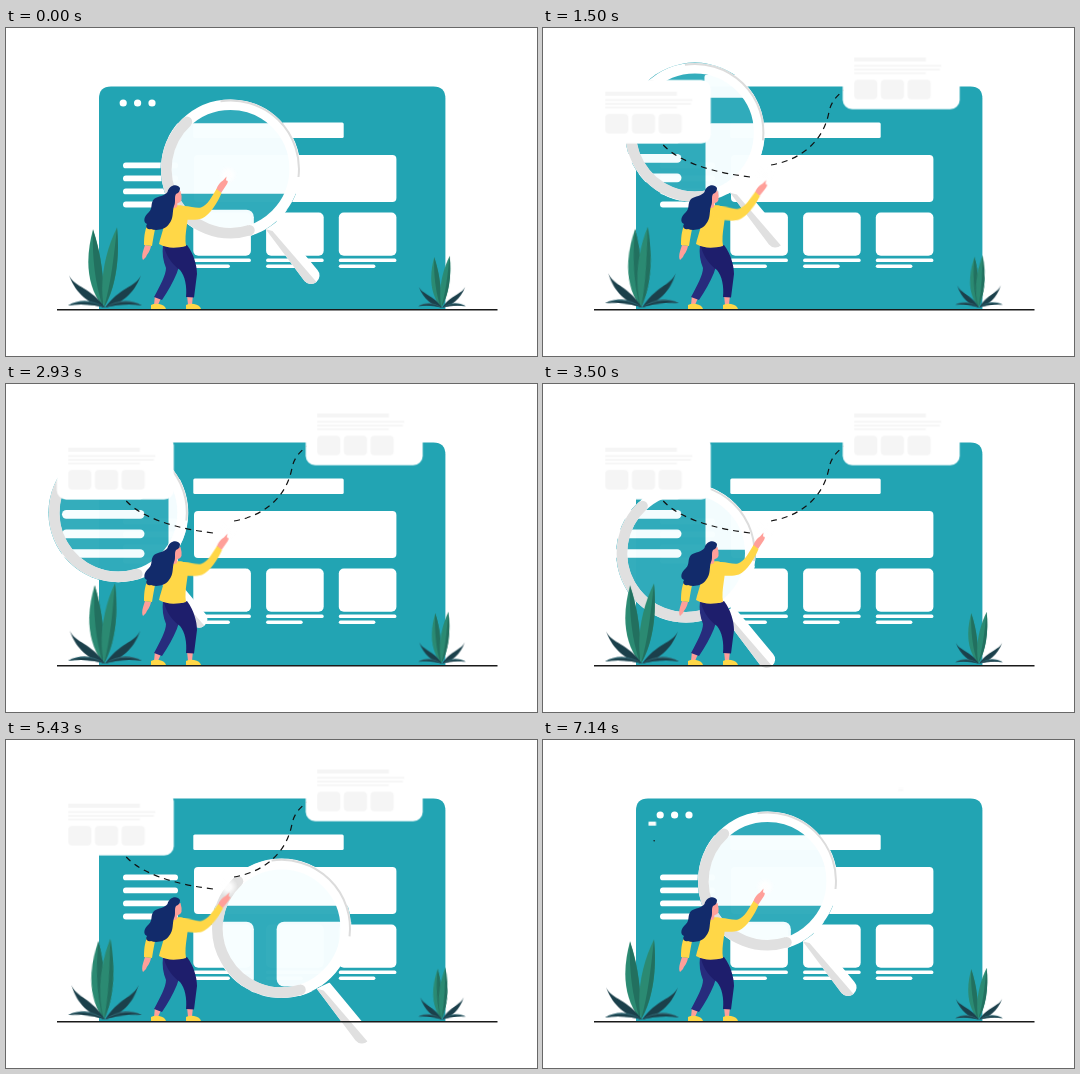
Animation of 531x328 px, one loop 7210 ms. Source, as an HTML page without scripts:

```html
<!DOCTYPE html>
<html lang="en">
<head>
<meta charset="utf-8">
<title>Search illustration</title>
<style>
@property --x { syntax: "<length>"; inherits: true; initial-value: 224.5px; }
@property --y { syntax: "<length>"; inherits: true; initial-value: 141px; }

html, body { margin: 0; width: 100%; height: 100%; overflow: hidden; background: #fff; }
svg { display: block; width: 100%; height: 100%; }

/* magnifier: the lens moves, its enlarged page stays put */
.glass { animation: roam 7.21s linear infinite; }
.lens { transform: translate(var(--x), var(--y)); }
.still { transform: translate(calc(var(--x) * -1), calc(var(--y) * -1)); }
@keyframes roam {
  0% { --x: 224.5px; --y: 141px; }
  5.55% { --x: 220px; --y: 138.5px; }
  10.96% { --x: 204px; --y: 127.5px; }
  15.95% { --x: 179px; --y: 115px; }
  20.8% { --x: 152px; --y: 104.5px; }
  25.66% { --x: 131.5px; --y: 98.5px; }
  31.76% { --x: 117px; --y: 103px; }
  37.45% { --x: 108.5px; --y: 116px; }
  44.04% { --x: 116.5px; --y: 142px; }
  48.54% { --x: 143px; --y: 169px; }
  54.5% { --x: 180px; --y: 194px; }
  58.95% { --x: 205px; --y: 203.5px; }
  63.38% { --x: 227px; --y: 208px; }
  65.9% { --x: 238px; --y: 208px; }
  70.3% { --x: 257px; --y: 203px; }
  75.31% { --x: 275.5px; --y: 188.5px; }
  76.28% { --x: 278px; --y: 182px; }
  81.83% { --x: 280px; --y: 154px; }
  87.24% { --x: 263px; --y: 139px; }
  92.93% { --x: 238px; --y: 138.5px; }
  99%, 100% { --x: 224.5px; --y: 141px; }
}

.card { animation: pop 7.21s linear infinite; }
@keyframes pop {
  0%, 4.2% { transform: scale(0); }
  7.2%, 96.9% { transform: scale(1); }
  98.06% { transform: scale(.49); }
  99.03% { transform: scale(.07); }
  99.2%, 100% { transform: scale(0); }
}

.trail { fill: none; stroke: #111; stroke-width: 1.2; stroke-dasharray: 6 5; }
.reveal { fill: none; stroke: #fff; stroke-width: 5; stroke-dasharray: 1 2; animation: draw 7.21s linear infinite; }
@keyframes draw {
  0%, 7.2% { stroke-dashoffset: 1.01; }
  14%, 91.5% { stroke-dashoffset: 0; }
  99.03% { stroke-dashoffset: .985; }
  99.2%, 100% { stroke-dashoffset: 1.01; }
}

.l, .r, .arm { animation: 1.8025s cubic-bezier(.37, 0, .63, 1) infinite alternate; }
.l { animation-name: lean-right; }
.r { animation-name: lean-left; }
.arm { animation-name: lower; transform-origin: 178px 184px; }
@keyframes lean-right { from { transform: rotate(0deg); } to { transform: rotate(4deg); } }
@keyframes lean-left { from { transform: rotate(0deg); } to { transform: rotate(-4.8deg); } }
@keyframes lower { from { transform: rotate(0deg); } to { transform: rotate(5deg); } }
</style>
</head>
<body>
<svg viewBox="0 0 531 328">
  <defs>
    <g id="tile">
      <rect x="187.3" y="184.6" width="57.6" height="43.2" rx="5"/>
      <rect x="187.3" y="230.6" width="57.6" height="3.5" rx="1.7"/>
      <rect x="187.3" y="236.6" width="36.6" height="3.4" rx="1.7"/>
    </g>
    <g id="page">
      <path fill="#22a4b3" d="M93 281V70.4Q93 58.4 105 58.4H427.4Q439.4 58.4 439.4 70.4V281Z"/>
      <g fill="#fff">
        <circle cx="117.2" cy="75" r="3.6"/>
        <circle cx="131.6" cy="75" r="3.6"/>
        <circle cx="146" cy="75" r="3.6"/>
        <rect x="187.3" y="94.6" width="150.4" height="15.4" rx="1.5"/>
        <rect x="188" y="127" width="202.4" height="47" rx="4"/>
        <rect x="117" y="134.5" width="55" height="5.8" rx="2.9"/>
        <rect x="117" y="147.5" width="55" height="5.8" rx="2.9"/>
        <rect x="117" y="160.5" width="55" height="5.8" rx="2.9"/>
        <rect x="117" y="173.6" width="55" height="5.8" rx="2.9"/>
        <use href="#tile"/>
        <use href="#tile" x="72.8"/>
        <use href="#tile" x="145.5"/>
      </g>
    </g>

    <g id="card">
      <rect x="-58.5" y="-31.7" width="117" height="63.4" rx="9.5" fill="#fff"/>
      <g fill="#f5f5f5">
        <path d="M-47-20H24.5V-16H-47ZM-47-12.5H40V-10.7H-47ZM-47-8.8H38.5V-7H-47ZM-47-5.2H24.5V-3.5H-47Z"/>
        <rect x="-47" y="2.3" width="23" height="19.5" rx="4"/>
        <rect x="-20.3" y="2.3" width="23" height="19.5" rx="4"/>
        <rect x="6.4" y="2.3" width="23" height="19.5" rx="4"/>
      </g>
    </g>

    <g id="tall-l">
      <path fill="#2b8a72" d="M-12-78C-19-52-20-24-2 0C0-26-4-54-12-78Z"/>
      <path fill="#22705f" d="M-12-78C-13-50-10-24-2 0C0-26-4-54-12-78Z"/>
    </g>
    <g id="tall-r">
      <path fill="#2b8a72" d="M12-80C0-56-6-26-1 0C11-20 15-50 12-80Z"/>
      <path fill="#22705f" d="M12-80C9-52 6-24-1 0C11-20 15-50 12-80Z"/>
    </g>
    <g id="side">
      <path fill="#1b404b" d="M-36-32C-30-20-14-20 0 0C-16-4-28-12-36-32Z"/>
      <path fill="#2f6470" d="M-37-2C-25-9-12-8 0 0C-12-3-25-4-37-2Z"/>
      <path fill="#1b404b" d="M-37-2C-25-7-12-6 0 0C-12-3-25-4-37-2Z"/>
    </g>

    <mask id="show" maskUnits="userSpaceOnUse" x="0" y="0" width="531" height="328">
      <path class="reveal" pathLength="1" d="M111 100C116 124 150 142 207 149"/>
      <path class="reveal" pathLength="1" d="M308 57C295 66 288 73 286 84C281 110 262 131 228 137"/>
    </mask>
    <clipPath id="round"><circle r="69.9"/></clipPath>
    <clipPath id="grip"><path d="M35 60L48 54L87 101A8.5 8.5 0 0 1 74 112Z"/></clipPath>
    <radialGradient id="glow">
      <stop offset=".3" stop-color="#fff" stop-opacity=".9"/>
      <stop offset="1" stop-color="#fff" stop-opacity="0"/>
    </radialGradient>
  </defs>

  <rect width="531" height="328" fill="#fff"/>
  <use href="#page"/>

  <g class="glass">
    <g class="lens">
      <g clip-path="url(#grip)">
        <rect x="30" y="50" width="62" height="68" fill="#fff"/>
        <path fill="#e0e0e0" d="M34 60L42 62L86 113L80 118L70 114Z"/>
      </g>
      <g clip-path="url(#round)">
        <g class="still" opacity=".98">
          <use href="#page" transform="matrix(1.5 0 0 1.5 -119.5 -95.25)"/>
        </g>
        <circle r="60" fill="#b0f0ff" opacity=".1"/>
      </g>
      <g fill="none">
        <circle r="64.2" stroke="#fff" stroke-width="10.6"/>
        <path stroke="#e0e0e0" stroke-width="10.6" d="M-43.5-47.2A64.2 64.2 0 0 0 19 61.3"/>
        <path stroke="#dcdcdc" stroke-width="2" d="M-10-67.8A68.5 68.5 0 0 1 68 8"/>
      </g>
      <circle cx="-43.5" cy="-47.2" r="5.2" fill="#e0e0e0"/>
      <circle cx="19" cy="61.3" r="5.2" fill="#e0e0e0"/>
    </g>
  </g>

  <g mask="url(#show)">
    <path class="trail" d="M207 149C150 142 116 124 111 100"/>
    <path class="trail" d="M228 137C262 131 281 110 286 84C288 73 295 66 308 57"/>
  </g>
  <g transform="translate(109.3 83.7)"><use href="#card" class="card"/></g>
  <g transform="translate(358.2 49.5)"><use href="#card" class="card"/></g>

  <path d="M51 281.7H491.5" stroke="#1a1a1a" stroke-width="1.6"/>

  <g transform="translate(99 279.5)">
    <use href="#tall-l" class="l"/>
    <use href="#tall-r" class="r"/>
    <use href="#side" class="l"/>
    <g transform="scale(-1 1)"><use href="#side" class="l"/></g>
  </g>
  <g transform="translate(436 279.5) scale(.645)">
    <use href="#tall-l" class="l"/>
    <use href="#tall-r" class="r"/>
    <use href="#side" class="l"/>
    <g transform="scale(-1 1)"><use href="#side" class="l"/></g>
  </g>

  <circle cx="222" cy="147" r="10" fill="url(#glow)"/>

  <!-- woman -->
  <g fill="#ff9f99">
    <path d="M139 217L145 218C144 224 141 226 140 229L137 232C135 229 137 223 139 217Z"/>
    <path d="M149 267L155 270L152 277H148ZM181 267H187L186 277H182Z"/>
  </g>
  <g fill="#ffd747">
    <path d="M143 194L150 197C148 205 147 212 146 218L138 217C138 208 139 200 143 194Z"/>
    <path d="M145 281V277Q149 275 153 276Q159 277 160 281ZM180 281V277Q184 275 188 276Q194 277 195 281Z"/>
  </g>
  <path fill="#272c7d" d="M157 217L175 219C177 236 168 254 156 272L148 269C154 258 160 247 160 240C157 233 156 225 157 217Z"/>
  <path fill="#1e1e6c" d="M158 218C165 221 175 220 181 217C188 226 191 238 191 246L188 269.5L180 269C181 258 179 248 174 242C166 236 160 228 158 218Z"/>
  <path fill="#ffd747" d="M166 179C172 176 180 177 182 182C183 192 178 205 180 218C171 220 162 221 153 216C155 207 160 196 158 188C158 184 161 180 166 179Z"/>
  <g class="arm">
    <path fill="#ff9f99" d="M210 162C212 157 214 154 217 152.5L220.5 148.5L220 152.5Q223 152 221 156L215 165Z"/>
    <path fill="#ffd747" d="M171 179C181 176 189 181 195 179.5C202 177 206 168 210.5 161L215.5 165C212 174 204 187 196 190.5C188 193 180 191 171 191Z"/>
  </g>
  <path fill="#ff9f99" d="M168 165L174.5 163Q176 168 175.5 172Q174 175.5 171.5 175L171 179Q168 181 165 179Z"/>
  <path fill="#122b6b" d="M174 160C171 155 163 157 161.5 164C159 168 152 168 148 171C144 176 147 180 143 184C138 188 136.5 194 141 196C139 199 141 202 145 201C150 203 159 202 163 196C168 190 166 184 168 178C170 174 168 169 170 166C173 165 174 163 174 160Z"/>
</svg>
</body>
</html>
```
